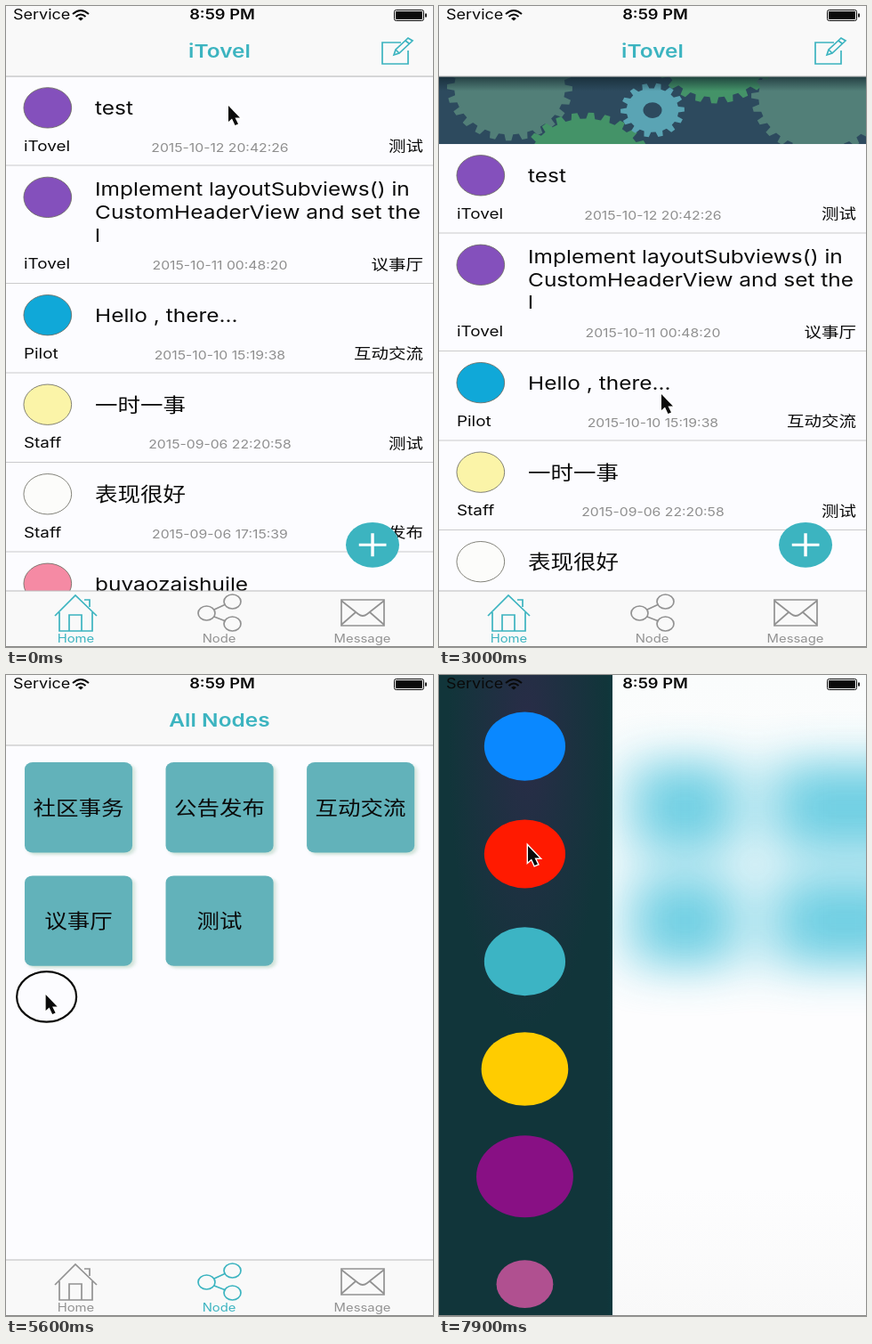
Animation, 480 px wide and 720 px high, one loop 8 s. Source, as an HTML page:

```html
<!DOCTYPE html>
<html lang="en">
<head>
<meta charset="utf-8">
<title>Forum app</title>
<style>
  html, body { margin: 0; width: 100%; height: 100%; overflow: hidden; background: #fcfcff; }
  svg { display: block; width: 480px; height: 720px; }
  text { font-family: Inter, "Noto Sans CJK SC", "Noto Sans CJK", sans-serif; fill: #0a0a0a; white-space: pre; }
</style>
</head>
<body>
<svg id="stage" viewBox="0 0 320 568" preserveAspectRatio="none">
  <defs>
    <linearGradient id="sea" x1="0" y1="0" x2="0.25" y2="1">
      <stop offset="0" stop-color="#3a9fa0"/><stop offset="0.3" stop-color="#36a4a8"/>
      <stop offset="0.6" stop-color="#34a8b0"/><stop offset="1" stop-color="#36b0b4"/>
    </linearGradient>
    <linearGradient id="frost" x1="0" y1="0" x2="0" y2="1">
      <stop offset="0" stop-color="#fafcfc"/><stop offset="0.3" stop-color="#fdfdfe"/>
      <stop offset="0.8" stop-color="#fdfdfe"/><stop offset="1" stop-color="#f9f9f9"/>
    </linearGradient>
    <linearGradient id="drop" x1="0" y1="0" x2="0" y2="1">
      <stop offset="0" stop-color="#132830" stop-opacity="0.75"/><stop offset="1" stop-color="#132830" stop-opacity="0"/>
    </linearGradient>
    <linearGradient id="edge">
      <stop offset="0" stop-color="#0c3a40" stop-opacity="0"/><stop offset="1" stop-color="#0c3a40" stop-opacity="0.75"/>
    </linearGradient>
    <radialGradient id="night" cx="0.5" cy="0.1" r="0.45">
      <stop offset="0" stop-color="#2a2c48"/><stop offset="1" stop-color="#11353a"/>
    </radialGradient>
    <filter id="blur" x="-50%" y="-50%" width="200%" height="200%" color-interpolation-filters="sRGB">
      <feGaussianBlur stdDeviation="20"/>
    </filter>
    <filter id="soft" x="-20%" y="-20%" width="140%" height="140%" color-interpolation-filters="sRGB">
      <feGaussianBlur stdDeviation="1.3"/>
    </filter>
    <filter id="mist" x="-20%" y="-20%" width="140%" height="140%" color-interpolation-filters="sRGB">
      <feGaussianBlur stdDeviation="5"/>
    </filter>
    <clipPath id="screen"><rect width="320" height="568"/></clipPath>
  </defs>
</svg>
<script>
const SX = 1.5, SY = 720 / 568, LOOP = 8000, STEP = 100;
const TEAL = '#3cb4c0', IDLE = '#929292', BAR = '#f9f9f9', RULE = '#cbcbcc';
const NAV = 62.4, MENU_W = 130;
const stage = document.getElementById('stage');

function el(tag, attrs, parent, content) {
  const node = document.createElementNS('http://www.w3.org/2000/svg', tag);
  for (const k in attrs) node.setAttribute(k, attrs[k]);
  if (content) node.textContent = content;
  parent.appendChild(node);
  return node;
}
const group = (parent, attrs = {}) => el('g', attrs, parent);
const rect = (p, x, y, width, height, fill, more) => el('rect', { x, y, width, height, fill, ...more }, p);
const text = (p, x, y, size, str, more) => el('text', { x, y, 'font-size': size, ...more }, p, str);
const line = (p, y, w, stroke) => el('path', { d: `M0 ${y}H${w}`, stroke, 'stroke-width': 0.8 }, p);
const path = (p, d, more) => el('path', { d, ...more }, p);
const move = (node, x, y) => node.setAttribute('transform', `translate(${x} ${y})`);
const show = (node, on) => node.setAttribute('visibility', on ? 'visible' : 'hidden');
// Icons are drawn in stage pixels
const pixels = (p, more) => group(p, { transform: `scale(${1 / SX} ${1 / SY})`, fill: 'none', 'stroke-width': 1.7, ...more });
const middle = { 'text-anchor': 'middle' };

let seed = 11;
const rnd = () => (seed = seed * 16807 % 2147483647) / 2147483647;
const spread = n => (rnd() - 0.5) * n;

// Side menu
const menu = group(stage);
rect(menu, 0, 0, MENU_W + 2, 568, 'url(#sea)');
const patches = group(menu, { filter: 'url(#mist)', opacity: 0.35 });
for (let i = 0; i < 50; i++) {
  el('ellipse', {
    cx: rnd() * 130, cy: rnd() * 568, rx: 5 + rnd() * 14, ry: 5 + rnd() * 14,
    fill: i % 2 ? '#5cc8c4' : '#26868e'
  }, patches);
}
const veins = group(menu, { fill: 'none', stroke: '#70d0cc', opacity: 0.3 });
for (let i = 0; i < 130; i++) {
  let d = `M${rnd() * 130} ${rnd() * 568}q${spread(30)} ${spread(30)} ${spread(40)} ${spread(40)}`;
  for (let k = 0; k < 2; k++) d += `t${spread(40)} ${spread(40)}`;
  path(veins, d, { 'stroke-width': 0.4 + rnd() * 1.4 });
}
rect(menu, 0, 134, MENU_W + 2, 28, '#74999a', { opacity: 0.65 });
el('circle', { cx: 60, cy: 66.2, r: 35.2, fill: '#9058c8' }, menu);
text(menu, 12, 152, 14.5, 'Change Theme', { style: 'fill:#2c88a4' });
['Notification', 'Favorite', 'Profile', 'Setting'].forEach((s, i) => {
  text(menu, 14.7, 202 + i * 70.2, 16, s);
  line(menu, 231.3 + i * 70.2, MENU_W + 2, '#90c4c8');
});

// Theme picker above the menu
const picker = group(stage);
rect(picker, 0, 0, MENU_W + 2, 568, 'url(#night)');
const bubbles = ['#0a88ff', '#ff1a00', '#3cb4c4', '#ffcc00', '#881084', '#b05090']
  .map((fill, i) => el('circle', { cx: 64.3, cy: 63.2 + i * 95.3, fill }, picker));

// Main screen
const main = group(stage);
rect(main, 0, 0, 320, 568, '#fcfcff');
const home = group(main), nodes = group(main);

function gearPath(r, teeth, depth, hole) {
  let d = '';
  const pitch = 2 * Math.PI / teeth;
  for (let i = 0; i < teeth; i++) {
    [[-0.3, r - depth], [-0.17, r], [0.17, r], [0.3, r - depth]].forEach(([f, rad]) => {
      const a = (i + f) * pitch;
      d += `${d ? 'L' : 'M'}${(rad * Math.cos(a)).toFixed(2)} ${(rad * Math.sin(a)).toFixed(2)}`;
    });
  }
  d += 'Z';
  if (hole) d += `M${hole} 0A${hole} ${hole} 0 1 0 ${-hole} 0A${hole} ${hole} 0 1 0 ${hole} 0Z`;
  return d;
}
const header = group(home);
rect(header, 0, NAV, 320, 130, '#2d4a5e');
const gears = [
  [-107, -20, 47, 24, '#527f78', 0], [125, -12, 51, 26, '#527f78', 0],
  [-50, 52, 50, 25, '#449368', 0], [47, -53, 47, 24, '#449368', 0],
  [0, 0, 24, 14, '#5aa4b4', 7]
].map(([x, y, r, teeth, fill, hole]) => ({
  x, y, ratio: hole ? 1 : -14 / teeth,
  node: path(header, gearPath(r, teeth, r > 30 ? 5.5 : 4.5, hole), { fill, 'fill-rule': 'evenodd' })
}));
rect(header, 0, NAV, 320, 13, 'url(#drop)');

const list = group(home);
rect(list, 0, NAV, 320, 520, '#fcfcff');
const rows = [
  ['#8450bc', ['test'], 'iTovel', '2015-10-12 20:42:26', '测试'],
  ['#8450bc', ['Implement layoutSubviews() in', 'CustomHeaderView and set the', 'l'], 'iTovel', '2015-10-11 00:48:20', '议事厅'],
  ['#10a8d8', ['Hello , there...'], 'Pilot', '2015-10-10 15:19:38', '互动交流'],
  ['#fbf4a8', ['一时一事'], 'Staff', '2015-09-06 22:20:58', '测试'],
  ['#fcfcfa', ['表现很好'], 'Staff', '2015-09-06 17:15:39', '公告发布'],
  ['#f58aa4', ['buyaozaishuile'], 'Staff', '2015-09-06 16:40:12', '测试']
];
let top0 = NAV - 0.4;
rows.forEach(([fill, lines, name, date, node]) => {
  const row = group(list, { transform: `translate(0 ${top0})` });
  const h = lines.length > 1 ? 104.4 : 79.3;
  const first = lines.length > 1 ? 26.6 : 34.4;
  el('circle', { cx: 31.2, cy: 28.2, r: 17.9, fill, stroke: '#6a6a60', 'stroke-width': 0.6 }, row);
  lines.forEach((s, i) => text(row, 66.7, first + i * 20.4, s.charCodeAt(0) > 255 ? 17 : 16.3, s));
  text(row, 13.3, h - 12.8, 12.6, name);
  text(row, 160.3, h - 11.9, 10.5, date, { ...middle, style: 'fill:#8e8e8e' });
  text(row, 312.7, h - 12.4, 13, node, { 'text-anchor': 'end' });
  line(row, h, 320, RULE);
  top0 += h;
});
const scroller = rect(home, 315.5, 63, 3, 168, '#7a7a7a', { rx: 1.5 });
el('circle', { cx: 274.7, cy: 477.5, r: 20, fill: TEAL }, home);
path(home, 'M264.5 477.5H285M274.7 467.3V487.7', { stroke: '#fff', 'stroke-width': 2.3 });

const tilePos = i => [14 + i % 3 * 105.7, 77.3 + Math.floor(i / 3) * 100.5];
const tile = (p, i, fill, d = 0) => {
  const [x, y] = tilePos(i);
  return rect(p, x + d, y + d, 80.7, 80, fill, { rx: 6 });
};
['社区事务', '公告发布', '互动交流', '议事厅', '测试'].forEach((s, i) => {
  const [x, y] = tilePos(i);
  tile(nodes, i, '#cfe2d8', 2).setAttribute('filter', 'url(#soft)');
  tile(nodes, i, '#62b2ba');
  text(nodes, x + 40.3, y + 46.2, 17, s, middle);
});

// Bars
rect(main, 0, 0, 320, NAV, BAR);
line(main, NAV, 320, '#bcbcbc');
const heading = { ...middle, 'font-weight': 600, style: `fill:${TEAL}` };
const homeBar = group(main), nodeBar = group(main);
text(homeBar, 160, 45.8, 16.3, 'iTovel', heading);
text(nodeBar, 160, 45.8, 16.3, 'All Nodes', heading);
path(pixels(homeBar, { stroke: TEAL }),
  'M444 41H423V65H452V50M436 55L438 49L452 36L457 39L442 53ZM438 49L442 53M449 39L453 42');

rect(main, 0, 518.3, 320, 50, BAR);
line(main, 518.3, 320, '#bcbcbc');
const tabs = [
  ['Home', 52.3, 'M55 685L78 662L102 685M60 681V702H97V681M71 702V684H85V702M88 667H94V675'],
  ['Node', 159.7, 'M245 669a9.5 8 0 1 0 19 0a9.5 8 0 1 0-19 0M216 682a9.5 8 0 1 0 19 0a9.5 8 0 1 0-19 0M245 694a9.5 8 0 1 0 19 0a9.5 8 0 1 0-19 0M234 678L247 672M234 686L247 691'],
  ['Message', 267, 'M377 667H425V696H377ZM377 668L396 683Q401 687 406 683L425 668M377 695L393 681M425 695L409 681']
].map(([label, x, d]) => ({
  icon: path(pixels(main), d),
  label: text(main, x, 564, 9.9, label, middle)
}));
const lightTab = active => tabs.forEach((tab, i) => {
  const c = i === active ? TEAL : IDLE;
  tab.icon.setAttribute('stroke', c);
  tab.label.style.fill = c;
});

// Frosted cover while the menu is open
const frost = group(main, { 'clip-path': 'url(#screen)' });
rect(frost, 0, 0, 320, 568, 'url(#frost)');
const haze = group(frost, { filter: 'url(#blur)', opacity: 0.9 });
const hazeTiles = Array.from({ length: 5 }, (_, i) => tile(haze, i, '#60cae0'));
// The blur repeats whatever touches the right side of the screen
const stretchHaze = slide => hazeTiles.forEach((node, i) => {
  const x = tilePos(i)[0], limit = 320 - slide;
  const cut = x < limit && x + 80.7 > limit;
  node.setAttribute('width', cut ? Math.max(80.7, limit + 40 - x) : 80.7);
});
const edge = rect(main, -4, 0, 4, 568, 'url(#edge)');
line(stage, 567.6, 320, '#8a8a88');

// Status bar
text(stage, 5.3, 12.2, 12, 'Service');
text(stage, 162, 12.2, 12.2, '8:59 PM', { ...middle, 'font-weight': 600 });
const status = pixels(stage, { stroke: '#0a0a0a', 'stroke-width': 2 });
path(status, 'M75 9Q84 1 93 9M78.5 12Q84 7 89.5 12');
path(status, 'M81 14L84 12.5L87 14L84 16.5Z', { fill: '#0a0a0a', stroke: 'none' });
rect(status, 436.5, 4.5, 33, 12, 'none', { rx: 2, 'stroke-width': 1 });
rect(status, 438, 6, 30, 9, '#0a0a0a', { stroke: 'none' });
path(status, 'M472 8.5V12.5', { 'stroke-width': 1.8 });

// Pointer
const pointer = group(pixels(stage));
const ring = group(pointer);
[['#fff', 4], ['#0a0a0a', 2.2]].forEach(([stroke, w]) =>
  el('ellipse', { cx: 1, cy: 2.5, rx: 33.5, ry: 28.3, stroke, 'stroke-width': w }, ring));
path(pointer, 'M0 0V18L4 14.5L7.5 22L11 20.5L7.5 13.5H13Z',
  { fill: '#0a0a0a', stroke: '#fff', 'stroke-width': 2.8, 'paint-order': 'stroke' });

// Motion
const smooth = p => p * p * (3 - 2 * p);
function track(keys, t) {
  const i = keys.findIndex(k => k[0] > t);
  if (i < 0) return keys[keys.length - 1].slice(1);
  if (i === 0) return keys[0].slice(1);
  const [a, b] = [keys[i - 1], keys[i]];
  const p = smooth((t - a[0]) / (b[0] - a[0]));
  return a.slice(1).map((v, n) => v + (b[n + 1] - v) * p);
}
const pointerKeys = [[400, 250, 112], [1200, 250, 436], [3300, 250, 436], [4100, 231, 681], [4600, 231, 681],
  [5300, 4, 360], [5500, 4, 360], [5900, 264, 353], [6150, 264, 353], [6800, 100, 192]];
const pullKeys = [[450, 0], [1250, 102], [1400, 102], [1750, 71], [2900, 71], [3300, 0]];
const slideKeys = [[5778, 0], [6178, MENU_W]];
const barKeys = [[450, 0], [600, 0.75], [1800, 0.75], [2200, 0]];
const popKeys = [[0, 0], [180, 1.2], [380, 1]];
const presses = [[500, 1350], [4150, 4350], [5450, 5900], [6950, 7150]];
const SWITCH = 4250, PICK = 7200;

function draw(t) {
  const [pull] = track(pullKeys, t), [slide] = track(slideKeys, t);
  const onNodes = t >= SWITCH;
  [[home, !onNodes], [homeBar, !onNodes], [nodes, onNodes], [nodeBar, onNodes],
    [frost, slide > 0], [edge, slide > 0], [menu, slide > 0], [picker, t >= PICK]].forEach(([n, on]) => show(n, on));
  lightTab(onNodes ? 1 : 0);

  move(list, 0, pull);
  const turn = pull + Math.max(0, Math.min(t, 3300) - 1400) * 0.09;
  gears.forEach(g => g.node.setAttribute('transform',
    `translate(${160 + g.x} ${NAV + pull / 2 + g.y}) rotate(${turn * g.ratio})`));
  scroller.setAttribute('opacity', track(barKeys, t)[0]);

  move(main, slide, 0);
  frost.setAttribute('opacity', Math.min(1, slide / 40));
  stretchHaze(slide);
  picker.setAttribute('opacity', Math.max(0, Math.min(1, (t - PICK + 100) / 300)));
  bubbles.forEach((b, i) => b.setAttribute('r', 30.4 * track(popKeys, t - 7300 - i * 100)[0]));

  move(pointer, ...track(pointerKeys, t));
  show(ring, presses.some(([a, b]) => t >= a && t < b));
}

const start = performance.now();
function tick(now) {
  draw(Math.floor(Math.max(0, now - start) % LOOP / STEP) * STEP);
  requestAnimationFrame(tick);
}
draw(0);
requestAnimationFrame(tick);
</script>
</body>
</html>
```
